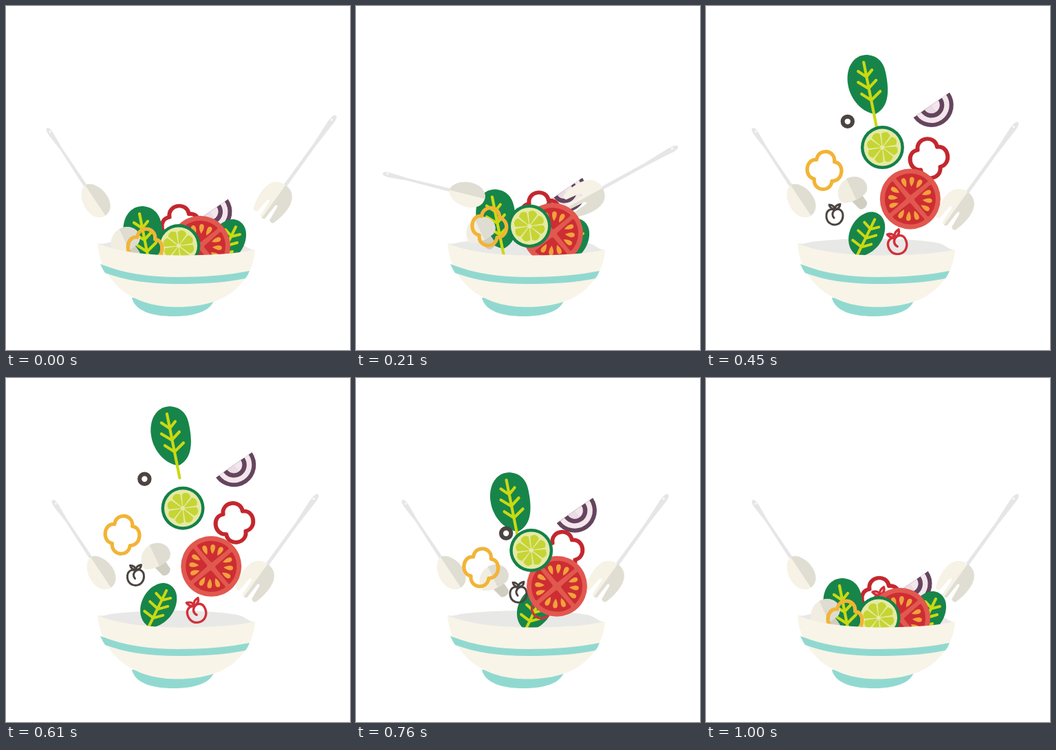
Animation, 500 px wide and 500 px high, one loop 1.03 s. Source, as an HTML page:

```html
<!DOCTYPE html>
<html lang="en">
<head>
<meta charset="utf-8">
<title>Tossed salad</title>
<style>
html, body { margin: 0; width: 100%; height: 100%; overflow: hidden; background: #fff; }
svg { display: block; width: 100vw; height: 100vh; }
.line { fill: none; stroke-linecap: round; stroke-linejoin: round; }

/* Each ingredient rises from --a to --p, hangs, then drops to --b. */
.toss, .tool { animation: 1030ms -1ms infinite both linear; }
.early { animation-name: early; }
.mid { animation-name: mid; }
.late { animation-name: late; }
@keyframes early {
  0% { translate: var(--a); }
  11.6505% { translate: var(--a); animation-timing-function: steps(13); }
  49.5146% { translate: var(--p); }
  56.3107% { translate: var(--p); animation-timing-function: steps(14); }
  97.0874%, 100% { translate: var(--b, var(--a)); }
}
@keyframes mid {
  0% { translate: var(--a); }
  14.5631% { translate: var(--a); animation-timing-function: steps(12); }
  49.5146% { translate: var(--p); }
  56.3107% { translate: var(--p); animation-timing-function: steps(14); }
  97.0874%, 100% { translate: var(--b, var(--a)); }
}
@keyframes late {
  0% { translate: var(--a); }
  17.4757% { translate: var(--a); animation-timing-function: steps(11); }
  49.5146% { translate: var(--p); }
  56.3107% { translate: var(--p); animation-timing-function: steps(14); }
  97.0874%, 100% { translate: var(--b, var(--a)); }
}

/* Servers dip into the bowl and swing back to rest. */
.spoon { animation-name: spoon; }
.fork { animation-name: fork; }
@keyframes spoon {
  0% { translate: 130px 283px; rotate: -33.7deg; animation-timing-function: steps(7); }
  20.3883% { translate: 162px 274px; rotate: -76deg; animation-timing-function: steps(4); }
  32.0388%, 100% { translate: 138px 283px; rotate: -33.7deg; }
}
@keyframes fork {
  0% { translate: 390px 283px; rotate: 35.7deg; animation-timing-function: steps(7); }
  20.3883% { translate: 334px 278px; rotate: 61deg; animation-timing-function: steps(4); }
  32.0388%, 100% { translate: 364px 293px; rotate: 35.7deg; }
}
</style>
</head>
<body>
<svg viewBox="0 0 500 500">
  <defs>
    <clipPath id="right"><rect x="0" y="-60" width="60" height="120"/></clipPath>
    <path id="ring" d="M-13 -14C-13 -32 13 -32 13 -14C29 -14 29 13 13 14C13 32 -13 32 -13 14C-29 13 -29 -14 -13 -14Z"/>
    <path id="spoonHead" d="M0 -27C9 -27 18 -13 18 2C18 17 10 26 0 26C-10 26 -18 17 -18 2C-18 -13 -9 -27 0 -27Z"/>
    <path id="forkHead" d="M-18 27C-24 10 -30 -27 0 -28C30 -27 24 10 18 27Q15 30 11 27L9 5Q7 1 5 5L4 29Q0 33 -4 29L-5 5Q-7 1 -9 5L-11 27Q-15 30 -18 27Z"/>
    <path id="segment" d="M0 -4L-5.5 -19Q0 -25 5.5 -19Z"/>
    <g id="quarter">
      <path d="M0 -8L-21 -28A35 35 0 0 1 21 -28Z" fill="#cd2d33" stroke="#cd2d33" stroke-width="4" stroke-linejoin="round"/>
      <g fill="#f2a13d">
        <path id="seed" d="M0 -18C-4 -24 -5 -32 0 -32C5 -32 4 -24 0 -18Z"/>
        <use href="#seed" transform="rotate(-25)"/>
        <use href="#seed" transform="rotate(25)"/>
      </g>
    </g>
    <g id="cherry" class="line" stroke-width="3">
      <path d="M0 -9C-6 -13 -13 -8 -12 1C-11 9 -5 12 0 12C7 12 12 6 12 -1C12 -9 6 -13 0 -9C-4 -6 -4 -1 -1 2"/>
      <path d="M0 -10C-4 -11 -7 -13 -8 -17C-3 -17 0 -14 0 -10C0 -14 3 -17 8 -18C8 -14 5 -11 0 -10"/>
    </g>
  </defs>

  <path fill="#e8e8e7" d="M133 345C145 347 146 343 160 342C220 336 290 337 335 344C347 346 351 353 361 355L340 370H150Z"/>

  <g class="toss mid" style="--a:296.5px 299px;--p:334px 113px">
    <g transform="rotate(-35)">
      <path fill="#65455e" d="M-32 0A32 32 0 0 0 32 0Z"/>
      <path fill="#f3e6ec" d="M-26 0A26 26 0 0 0 26 0Z"/>
      <path fill="#65455e" d="M-18.5 0A18.5 18.5 0 0 0 18.5 0Z"/>
      <path fill="#f3e6ec" d="M-12 0A12 12 0 0 0 12 0Z"/>
      <path fill="#e3d0db" opacity=".5" d="M-12 0A12 12 0 0 0 0 12V0Z"/>
    </g>
  </g>

  <g class="toss mid" style="--a:254px 319px;--p:338px 202px">
    <use href="#ring" class="line" stroke="#c4272e" stroke-width="5.4" transform="rotate(-9) scale(1.1 1.04)"/>
  </g>

  <g class="tool fork">
    <path fill="#e6e6e7" d="M-2.5 -24L-2 -100L-4 -138Q-4 -153 0 -153Q5 -153 4 -138L2.5 -100L2.5 -24Z"/>
    <circle cx="-1" cy="-144" r="1.5" fill="#fff"/>
    <use href="#forkHead" fill="#f6f2e5"/>
    <use href="#forkHead" fill="#e0ded3" clip-path="url(#right)"/>
  </g>

  <g class="toss late" style="--a:296px 310px;--p:187.5px 297px">
    <path fill="#17854a" d="M33 0C45 0 54 10 53 24C52 42 39 60 17 65C5 62 -1 50 0 37C2 17 17 1 33 0Z"/>
    <path class="line" stroke="#cbd911" stroke-width="4" d="M38 11L12 64M23 15L32 25L44 22M14 27L26 38L40 34M6 41L19 51L33 47"/>
  </g>

  <g class="toss mid" style="--a:227px 413px;--p:179px 284.5px;--b:312px 354px">
    <use href="#cherry" stroke="#4c4441"/>
  </g>

  <g class="toss mid" style="--a:276px 367px;--p:279px 343px;--b:257px 326px">
    <use href="#cherry" stroke="#d2303a" transform="rotate(-20) scale(1.13)"/>
  </g>

  <g class="toss late" style="--a:198px 291px;--p:241px 22px">
    <path fill="#17854a" d="M-1 0C14 0 25 9 28 26C33 50 34 76 13 86C-4 85 -24 66 -27 42C-30 20 -20 1 -1 0Z"/>
    <path class="line" stroke="#cbd911" stroke-width="4.2" d="M-4 11L14.5 104M-12 24L0 32L8 22M-12 40L3 49L14 37M-7 57L7 66L20 53"/>
  </g>

  <g class="toss mid" style="--a:245px 352px;--p:198px 131px">
    <circle r="7.2" fill="none" stroke="#4c4441" stroke-width="6"/>
  </g>

  <g class="tool spoon">
    <path fill="#e6e6e7" d="M-2.5 -24L-1.5 -90L-3.5 -116Q-4 -127 0 -127Q4 -127 3.5 -116L2 -90L2.5 -24Z"/>
    <circle cx="1" cy="-120" r="1.4" fill="#fff"/>
    <use href="#spoonHead" fill="#f6f2e5"/>
    <use href="#spoonHead" fill="#e0ded3" clip-path="url(#right)"/>
  </g>

  <g class="toss early" style="--a:282px 349px;--p:299.5px 268px">
    <circle r="44" fill="#e1584f"/>
    <g transform="rotate(5)">
      <use href="#quarter"/>
      <use href="#quarter" transform="rotate(90)"/>
      <use href="#quarter" transform="rotate(180)"/>
      <use href="#quarter" transform="rotate(270)"/>
    </g>
  </g>

  <g class="toss mid" style="--a:251px 348.5px;--p:257.5px 177px">
    <circle r="31.5" fill="#14814a"/>
    <circle r="27" fill="#e5eaa6"/>
    <g id="segments" fill="#c6d534" stroke="#c6d534" stroke-width="2" stroke-linejoin="round" transform="rotate(15)">
      <g id="half">
        <use href="#segment"/>
        <use href="#segment" transform="rotate(45)"/>
        <use href="#segment" transform="rotate(90)"/>
        <use href="#segment" transform="rotate(135)"/>
      </g>
      <use href="#half" transform="rotate(180)"/>
    </g>
  </g>

  <g class="toss mid" style="--a:173.5px 345px;--p:221px 257.5px">
    <path fill="#d0cdc1" d="M-3 10L12 0L21 13C22 20 14 25 10 23Z"/>
    <path fill="#f1eee1" d="M-16 14C-28 0 -18 -24 4 -24C20 -22 25 -8 18 1C8 9 -4 16 -16 14Z"/>
    <path fill="#dfdcd1" d="M-9 -21C-5 -23 -1 -24 4 -24C20 -22 25 -8 18 1C14 4 10 7 5 9Z"/>
  </g>

  <g class="toss early" style="--a:202px 351.5px;--p:166.5px 218.5px">
    <use href="#ring" class="line" stroke="#f2b436" stroke-width="5.2" transform="rotate(7)"/>
  </g>

  <path fill="#91d9d0" d="M183 424C187 443 212 451 243 451C273 451 297 444 302 428Z"/>
  <path fill="#f8f4e8" d="M133 345C165 358 205 362 250 362.500C295 362 330 361 362 354C361 376 350 398 331 414C309 432 278 438 245 437.500C214 437 186 428 166 411C146 393 135 371 133 345Z"/>
  <path fill="#91d9d0" d="M137 375C172 389 209 394 250 394C290 394 324 391 354 385Q352 391 348 396C320 402 286 404 250 404C208 404 174 399 144 388Q140 382 137 375Z"/>
</svg>
</body>
</html>
```
